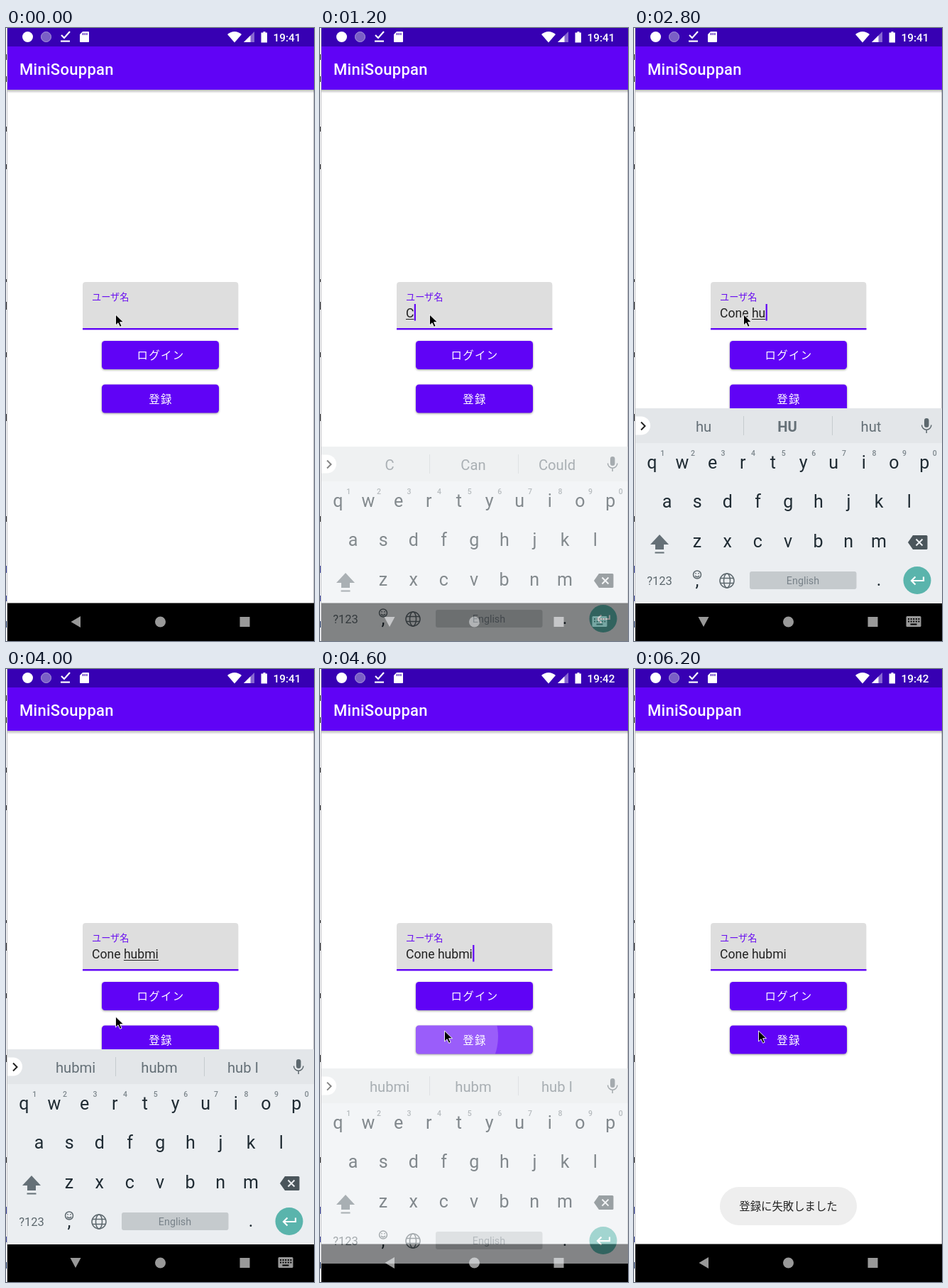
An HTML page for the animation above (6.4 s loop, 434x864 px).

```html
<!DOCTYPE html>
<html lang="ja">
<head>
<meta charset="utf-8">
<title>登録</title>
<style>
  html, body { margin: 0; width: 100%; height: 100%; overflow: hidden; background: #fff; }
  svg { display: block; width: 100vw; height: 100vh; }
  text { font-family: Roboto, "Noto Sans CJK JP", "Noto Sans CJK", sans-serif; white-space: pre; }
  .mid { text-anchor: middle; }
  .btn { fill: #6003f6; filter: drop-shadow(0 1.5px 1.5px rgba(0,0,0,.4)); }
  .cap { fill: #fff; font-size: 15.4px; letter-spacing: 1.37px; text-anchor: middle; }
  .input { fill: #222; font-size: 17.6px; }
  .key { fill: #1f2b33; font-size: 25px; text-anchor: middle; }
  .hint { fill: #7c868c; font-size: 10.5px; font-weight: 500; text-anchor: middle; }
  .sug { fill: #657077; font-size: 20.2px; text-anchor: middle; }
  .line { fill: none; stroke: #5d686e; stroke-width: 1.5; }
</style>
</head>
<body>
<svg viewBox="0 0 434 864">
  <defs>
    <linearGradient id="shade" x2="0" y2="1">
      <stop stop-opacity=".28"/><stop offset="1" stop-opacity="0"/>
    </linearGradient>
    <clipPath id="btnClip"><rect x="135" y="502.5" width="165" height="40" rx="4.4"/></clipPath>
  </defs>
  <rect width="434" height="864" fill="#fff"/>
  <g id="strip"></g>
  <path d="M1.5 0V864M433.5 87V811" stroke="#c4c4c8" fill="none"/>

  <rect x="2" y="87" width="432" height="5" fill="url(#shade)"/>
  <rect x="2" y="26" width="432" height="61" fill="#6003f6"/>
  <rect x="2" width="432" height="26" fill="#3700b3"/>
  <g fill="#fff">
    <circle cx="30.5" cy="12.5" r="7.5"/>
    <circle cx="56.5" cy="12.5" r="7" fill="#7a5fc6" stroke="#ab98dc"/>
    <path d="M78 10l4 4 8-9" fill="none" stroke="#fff" stroke-width="2.2"/>
    <rect x="77" y="17.5" width="13" height="2.2"/>
    <path d="M108 5h8q1 0 1 1v13q0 1-1 1h-11q-1 0-1-1V9z"/>
    <path d="M108.5 7v3m2.7-3v3m2.7-3v3" stroke="#3700b3" stroke-width="1.2"/>
    <path d="M312 9q10-8 20 0l-10 11.500z"/>
    <path d="M350 5v15h-15z" opacity=".4"/>
    <path d="M344.500 10.500v9.500h-9.500z"/>
    <path d="M362.500 5h3v1.500h2.500v14h-8.500v-14h3z"/>
    <text id="clock" x="376.500" y="18.500" font-size="15.400" font-weight="500"></text>
    <text x="19" y="65.500" font-size="22" font-weight="500" letter-spacing=".275">MiniSouppan</text>
  </g>

  <path d="M108 425V362.400q0-4.400 4.400-4.400h210.600q4.400 0 4.400 4.400V425z" fill="#dedede"/>
  <rect x="108" y="423" width="219.500" height="2.400" fill="#6003f6"/>
  <text x="121" y="383.500" font-size="13.200" fill="#6a10f0">ユーザ名</text>
  <text id="done" class="input" x="121" y="408"></text>
  <text id="word" class="input" y="408"></text>
  <rect id="under" y="410" height="1" fill="#222"/>
  <rect id="caret" y="389" width="2.200" height="23.500" fill="#6003f6"/>

  <rect class="btn" x="135" y="441" width="165" height="40" rx="4.4"/>
  <text class="cap" x="218" y="467">ログイン</text>
  <rect class="btn" x="135" y="502.500" width="165" height="40" rx="4.4"/>
  <g id="ripple" clip-path="url(#btnClip)" fill="#fff" fill-opacity=".2">
    <rect x="135" y="502" width="165" height="41"/>
    <circle id="wave" cx="176" cy="518"/>
  </g>
  <text class="cap" x="218" y="528.500">登録</text>

  <g id="toast">
    <rect x="121" y="730" width="193" height="54" rx="27" fill="#eee"/>
    <text class="mid" x="217.500" y="763" font-size="15.400" fill="#222">登録に失敗しました</text>
  </g>

  <rect x="2" y="810.500" width="432" height="54"/>
  <g fill="#999">
    <path id="back"/>
    <circle cx="217.500" cy="837" r="7.500"/>
    <rect x="329.500" y="830" width="14" height="14"/>
    <g id="switch">
      <rect x="383.500" y="829" width="21" height="15" rx="1.500"/>
      <path d="M386 833h16.500M386 836.500h16.500" stroke="#000" stroke-width="2" stroke-dasharray="2 1.600"/>
      <path d="M389.500 840.500h9" stroke="#000" stroke-width="2"/>
    </g>
  </g>

  <g id="board">
    <rect x="2" y="536" width="432" height="275" fill="#ebeef1"/>
    <rect x="2" y="536" width="432" height="49" fill="#e3e6e9"/>
    <path d="M2 547.500h8a13 13 0 0 1 0 26h-8z" fill="#fff"/>
    <path d="M10 555.500l5.500 5.500-5.500 5.500" fill="none" stroke="#222" stroke-width="2"/>
    <path d="M154.500 547v27M279.500 547v27" stroke="#c6cbcf"/>
    <g id="sugs"></g>
    <rect x="409" y="550" width="6.500" height="13" rx="3.250" fill="#5d686e"/>
    <path class="line" d="M405.500 559.500a6.700 6.700 0 0 0 13.400 0M412.200 566v5" stroke-width="2"/>
    <g id="keys"></g>
    <path d="M36 714l13 14h-7v7h-12v-7h-7zM29.500 738.500h13v2h-13z" fill="#657077"/>
    <path d="M393 715h19q1.500 0 1.500 1.500v17q0 1.500-1.500 1.500h-19l-7-10z" fill="#4a555b"/>
    <path d="M397.500 720.500l9 9m0-9l-9 9" stroke="#ebeef1" stroke-width="2"/>
    <text class="mid" x="36" y="785" font-size="16.500" fill="#5d686e">?123</text>
    <circle class="line" cx="89" cy="770.500" r="5.500" stroke-width="1.200"/>
    <path class="line" d="M86 772q3 3.500 6 0M87 768v1.500M91 768v1.500" stroke-width="1.200"/>
    <g class="line"><circle cx="131" cy="779" r="10"/><ellipse cx="131" cy="779" rx="4.500" ry="10"/>
      <path d="M122 775.500h18M122 782.500h18"/></g>
    <rect x="163" y="766" width="150.500" height="25" rx="3" fill="#c5cacd"/>
    <text class="mid" x="238" y="784" font-size="14.300" fill="#788289">English</text>
    <circle cx="399" cy="778.500" r="19.500" fill="#5ab4ac"/>
    <path d="M408 773.500v5.500h-17m5.500-5.500l-5.500 5.500 5.500 5.500" fill="none" stroke="#fff" stroke-width="2.200"/>
  </g>

  <path id="mouse" d="M0 0V15l3.500-3.300 2.600 5.600 2.500-1.100-2.500-5.500h4.900z" stroke="#fff" stroke-width=".9"/>
</svg>
<script>
const $ = id => document.getElementById(id);
const set = (id, attrs) => { for (const k in attrs) $(id).setAttribute(k, attrs[k]); };
const show = (id, on) => set(id, { visibility: on ? 'visible' : 'hidden' });
const clamp = x => Math.max(0, Math.min(1, x));
const ease = (t, from, to) => { const p = clamp((t - from) / (to - from)); return p * p * (3 - 2 * p); };
const label = (cls, x, y, s) => `<text class="${cls}" x="${x}" y="${y}">${s}</text>`;

// Slivers of the window behind the phone screen
$('strip').innerHTML = [[37, 8], [68, 8], [139, 7], [192, 7], [354, 4], [386, 11], [457, 7],
  [544, 10], [688, 8], [758, 10, '#3c46a0'], [800, 8, '#3c46a0'], [836, 9, '#27406e']]
  .map(([y, h, c = '#333']) => `<rect y="${y}" width="1.5" height="${h}" fill="${c}"/>`).join('');

const row = (chars, x, y) => [...chars].map((c, i) => label('key', x + 42.65 * i, y, c)).join('');
$('keys').innerHTML = row('qwertyuiop', 25.3, 621) + row('asdfghjkl', 46.6, 676) +
  row('zxcvbnm', 89, 732) + label('key', 89, 787, ',') + label('key', 345, 786, '.') +
  [...'1234567890'].map((c, i) => label('hint', 40.3 + 42.6 * i, 603, c)).join('');
$('sugs').innerHTML = [98, 216, 334].map(x => label('sug', x, 568.5, '')).join('');

const NAME = 'Cone hubmi', SPACE = 5, LOOP = 6400;
const typed = [1100, 1400, 1700, 2000, 2300, 2600, 2800, 3000, 3200, 3400];
const hints = ['', 'C,Can,Could', 'Co,Could,Come', 'Con,Co,Could', 'Cone,Cones,Come', 'and,is,the',
  'h,H,he', 'hu,HU,hut', 'hub,Hub,hubs', 'hubm,hub,hum', 'hubmi,hubm,hub I'];
const bold = [3, 7];

function drawInput(t) {
  const n = typed.filter(k => k <= t).length;
  const split = n < SPACE ? 0 : SPACE;
  $('done').textContent = NAME.slice(0, split);
  $('word').textContent = NAME.slice(split, n);
  const x = 121 + (split ? $('done').getComputedTextLength() : 0);
  const w = n > split ? $('word').getComputedTextLength() : 0;
  const last = n ? typed[n - 1] : -600;
  set('word', { x });
  set('under', { x, width: w });
  set('caret', { x: x + w + .3 });
  show('under', t < 4400);
  show('caret', (t - last) % 1000 < 500);
  const words = hints[n].split(',');
  [...$('sugs').children].forEach((el, i) => {
    el.textContent = words[i] || '';
    el.style.fontWeight = i == 1 && bold.includes(n) ? 700 : 400;
  });
}

function drawBoard(t) {
  const enter = clamp((t - 1200) / 250), leave = clamp((t - 4500) / 150);
  const y = 54 * ((1 - enter) ** 5 + leave ** 1.7);
  const alpha = t < 1200 ? 0 : Math.min(1, .55 + (t - 1200) / 300) * (1 - leave ** 2);
  set('board', { transform: `translate(0 ${y})`, opacity: alpha });
  const open = t >= 1200 && t < 4600;
  show('switch', open);
  set('back', { d: open ? 'M90.500 830h15l-7.500 14z' : 'M91.500 837l13.500-8v16z' });
}

function draw(t) {
  drawInput(t);
  drawBoard(t);
  $('clock').textContent = t < 4300 ? '19:41' : '19:42';
  const down = ease(t, 3600, 3900), side = ease(t, 4000, 4300);
  set('mouse', { transform: `translate(${154.5 + 21 * side} ${404 + 86 * down + 20 * side})` });
  set('wave', { r: Math.max(0, (t - 4400) * .375) });
  set('ripple', { opacity: t < 4400 ? 0 : clamp((5000 - t) / 300) });
  set('toast', { opacity: clamp((t - 5000) / 300) });
}

const start = performance.now();
function tick() {
  const t = (performance.now() - start) % LOOP;
  draw(Math.floor(t / 100) * 100);
  requestAnimationFrame(tick);
}
tick();
</script>
</body>
</html>
```
